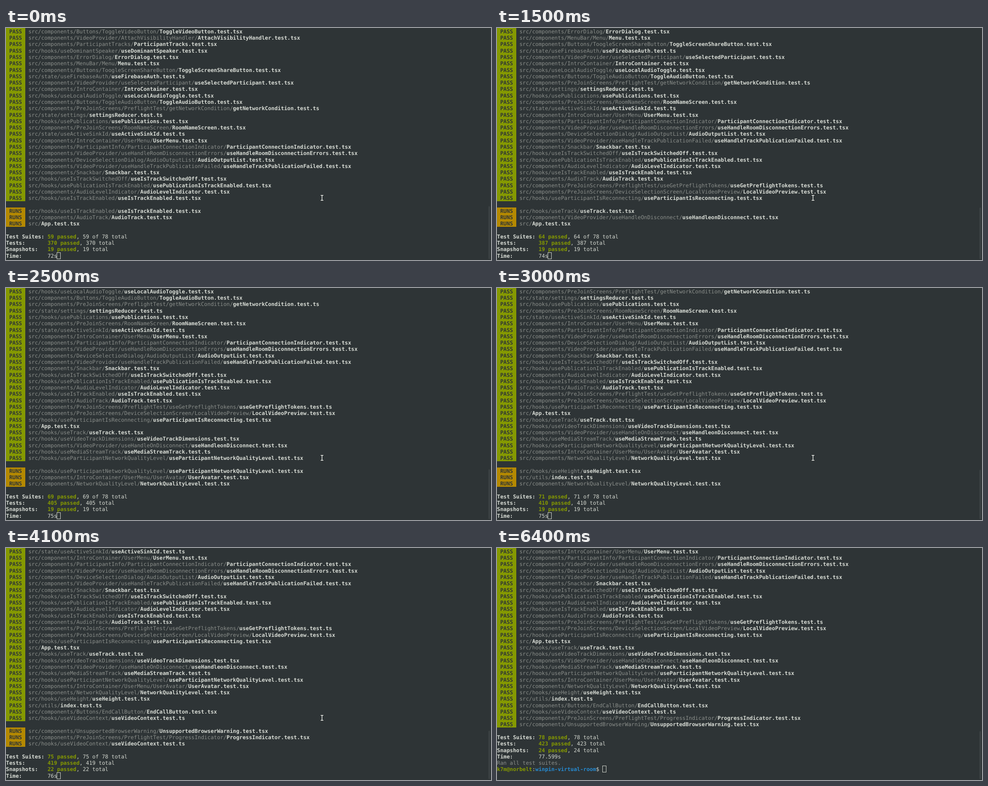
An HTML page that plays this animation: 1082x517 px, repeating every 7000 ms.

```html
<!DOCTYPE html>
<html lang="en">
<head>
<meta charset="utf-8">
<title>Test run</title>
<style>
  html, body { margin: 0; width: 100%; height: 100%; overflow: hidden; background: #2e3436; }
  #stage { position: relative; width: 1082px; height: 517px; overflow: hidden; }
  #screen {
    position: absolute; inset: 0; color: #d3d7cf;
    font: 11.853px/14.28px "DejaVu Sans Mono", monospace;
    text-rendering: geometricPrecision; font-variant-ligatures: none;
  }
  .row { position: absolute; left: 0; white-space: pre; }
  b { color: #d9ddd6; }
  .dim { color: #8b8f8b; }
  .tag { color: #2e3436; }
  .ok { color: #859900; }
  .dir { color: #268bd2; }
  .block { position: absolute; left: 0; width: 43px; }
  .caret {
    position: absolute; top: -1px; width: 9px; height: 15px; margin-left: -.8px;
    box-sizing: border-box; border: 1px solid #d3d7cf;
  }
  #bar { position: absolute; left: 1076px; width: 4px; bottom: 2px; background: #3a4042; border-radius: 2px; }
  #mouse { position: absolute; left: -4px; top: -7px; }
</style>
</head>
<body>
<div id="stage">
  <div id="screen"></div>
  <div id="bar"></div>
  <svg id="mouse" width="8" height="14" viewBox="-4 -7 8 14" fill="none">
    <defs><path id="beam" d="M-3-5.5H3M0-5.5V5.5M-3 5.5H3"/></defs>
    <use href="#beam" stroke="#1d2122" stroke-width="3"/>
    <use href="#beam" stroke="#f2f4f0" stroke-width="1.5"/>
  </svg>
</div>
<script>
const LOOP = 7000, STEP = 100, ROW = 14.28, MAX_TOP = 17;

const suites = `
components/Buttons/ToggleVideoButton/ToggleVideoButton.tsx
components/VideoProvider/AttachVisibilityHandler/AttachVisibilityHandler.tsx
components/ParticipantTracks/ParticipantTracks.tsx
hooks/useDominantSpeaker/useDominantSpeaker.tsx
components/ErrorDialog/ErrorDialog.tsx
components/MenuBar/Menu/Menu.tsx
components/Buttons/ToogleScreenShareButton/ToggleScreenShareButton.tsx
state/useFirebaseAuth/useFirebaseAuth.ts
components/VideoProvider/useSelectedParticipant/useSelectedParticipant.tsx
components/IntroContainer/IntroContainer.tsx
hooks/useLocalAudioToggle/useLocalAudioToggle.tsx
components/Buttons/ToggleAudioButton/ToggleAudioButton.tsx
components/PreJoinScreens/PreflightTest/getNetworkCondition/getNetworkCondition.ts
state/settings/settingsReducer.ts
hooks/usePublications/usePublications.tsx
components/PreJoinScreens/RoomNameScreen/RoomNameScreen.tsx
state/useActiveSinkId/useActiveSinkId.ts
components/IntroContainer/UserMenu/UserMenu.tsx
components/ParticipantInfo/ParticipantConnectionIndicator/ParticipantConnectionIndicator.tsx
components/VideoProvider/useHandleRoomDisconnectionErrors/useHandleRoomDisconnectionErrors.tsx
components/DeviceSelectionDialog/AudioOutputList/AudioOutputList.tsx
components/VideoProvider/useHandleTrackPublicationFailed/useHandleTrackPublicationFailed.tsx
components/Snackbar/Snackbar.tsx
hooks/useIsTrackSwitchedOff/useIsTrackSwitchedOff.tsx
hooks/usePublicationIsTrackEnabled/usePublicationIsTrackEnabled.tsx
components/AudioLevelIndicator/AudioLevelIndicator.tsx
hooks/useIsTrackEnabled/useIsTrackEnabled.tsx
components/AudioTrack/AudioTrack.tsx
components/PreJoinScreens/PreflightTest/useGetPreflightTokens/useGetPreflightTokens.ts
components/PreJoinScreens/DeviceSelectionScreen/LocalVideoPreview/LocalVideoPreview.tsx
hooks/useParticipantIsReconnecting/useParticipantIsReconnecting.tsx
App.tsx
hooks/useTrack/useTrack.tsx
hooks/useVideoTrackDimensions/useVideoTrackDimensions.tsx
components/VideoProvider/useHandleOnDisconnect/useHandleonDisconnect.tsx
hooks/useMediaStreamTrack/useMediaStreamTrack.ts
hooks/useParticipantNetworkQualityLevel/useParticipantNetworkQualityLevel.tsx
components/IntroContainer/UserMenu/UserAvatar/UserAvatar.tsx
components/NetworkQualityLevel/NetworkQualityLevel.tsx
hooks/useHeight/useHeight.tsx
utils/index.ts
components/Buttons/EndCallButton/EndCallButton.tsx
hooks/useVideoContext/useVideoContext.ts
components/PreJoinScreens/PreflightTest/ProgressIndicator/ProgressIndicator.tsx
components/UnsupportedBrowserWarning/UnsupportedBrowserWarning.tsx`.trim().split('\n');

// Suites finish in list order; three runners take the next one from the queue.
const FIRST = 26, RUNNERS = [26, 27, 31];
const queue = [29, 28, 30, 32, 34, 35, 33, 36, 37, 38, 39, 40, 42, 44, 41, 43];

// Key points of progress, linear in between: time, lines printed, suites counted, tests
const TIME = 0, PRINTED = 1, DONE = 2, TESTS = 3;
const keys = [
  [0, 27, 59, 370], [100, 28, 60, 372], [300, 28, 61, 377], [1000, 29, 62, 381],
  [1700, 33, 66, 394], [2500, 37, 69, 405], [3400, 41, 74, 418],
  [4100, 43, 75, 419], [4400, 43, 75, 419], [4700, 45, 78, 423]
];

function progress(from, to, value) {
  const i = keys.findLastIndex(key => key[from] <= value);
  const a = keys[i], b = keys[i + 1];
  if (!b) return a[to];
  return Math.floor(a[to] + (b[to] - a[to]) * (value - a[from]) / (b[from] - a[from]) + 1e-6);
}

function running(done) {
  const slots = [...RUNNERS], finished = done - keys[0][DONE];
  for (let i = 0; i < finished; i++) slots[slots.indexOf(FIRST + i)] = queue[i];
  return slots.filter(id => id !== undefined);
}

const $ = id => document.getElementById(id);
const caret = '<span class="caret"></span>';

function suiteLine(tag, id) {
  const path = 'src/' + suites[id].replace(/\.(tsx?)$/, '.test.$1');
  const cut = path.lastIndexOf('/') + 1;
  return `<b class="tag"> ${tag} </b> <span class="dim">${path.slice(0, cut)}</span><b>${path.slice(cut)}</b>`;
}

const label = text => `<b>${text.padEnd(13)}</b>`;
const count = (name, n, total = n) =>
  `${label(name)}<b class="ok">${n} passed</b>, ${total} total`;
const block = (from, rows, color) =>
  `<div class="block" style="top:${from * ROW}px;height:${rows * ROW}px;background:${color}"></div>`;

function screenAt(t) {
  const printed = progress(TIME, PRINTED, t), done = progress(TIME, DONE, t);
  const runs = running(done);
  const top = Math.min(printed - 27, MAX_TOP), shown = printed - top;
  const ended = t >= 4800, prompt = t >= 4900;
  const seconds = ended ? 77.599 : Math.min(77, 72 + Math.floor((t + 700) / 1000));
  const snaps = done >= 78 ? 24 : done >= 72 ? 22 : 19;

  const lines = [];
  for (let id = top; id < printed; id++) lines.push(suiteLine('PASS', id));
  lines.push('');
  if (runs.length) lines.push(...runs.map(id => suiteLine('RUNS', id)), '');
  lines.push(
    count('Test Suites:', done, done < 78 ? `${done} of 78` : done),
    count('Tests:', progress(DONE, TESTS, done)),
    count('Snapshots:', snaps),
    `${label('Time:')}${seconds}s`
  );
  if (ended) lines.push('<span class="dim">Ran all test suites.</span>');
  if (prompt) lines.push('<b class="ok">k7m@norbelt</b>:<b class="dir">winpin-virtual-room</b>$ ');
  lines[lines.length - 1] += caret;

  const html = block(0, shown, '#859900') + block(shown + 1, runs.length, '#b58900') +
    lines.map((line, i) => `<div class="row" style="top:${(i * ROW + .9).toFixed(2)}px">${line}</div>`).join('');
  return { html, barTop: 397 + top * .65 };
}

const ramp = (t, from, to) => Math.min(1, Math.max(0, (t - from) / (to - from)));
const bend = (a, b, c, p) => (1 - p) ** 2 * a + 2 * p * (1 - p) * b + p * p * c;

// Two small nudges, then a sweep to the right and out through the top.
function pointerAt(t) {
  const drift = ramp(t, 4500, 4900), nudge = ramp(t, 5200, 5400), sweep = ramp(t, 5500, 6300);
  return [
    bend(705 - 16 * drift - 94 * nudge, 1090, 140, sweep),
    bend(378.5 + 14 * drift - 5 * nudge, 230, 7.5, sweep)
  ];
}

let current = -1;

function draw(now) {
  const t = Math.floor(now % LOOP / STEP) * STEP;
  if (t === current) return;
  current = t;
  const { html, barTop } = screenAt(t);
  $('screen').innerHTML = html;
  $('bar').style.top = barTop + 'px';
  const [x, y] = pointerAt(t);
  $('mouse').style.transform = `translate(${x}px, ${y}px)`;
  $('mouse').style.visibility = t < 6400 ? 'visible' : 'hidden';
}

const start = performance.now();
function loop() {
  draw(performance.now() - start);
  requestAnimationFrame(loop);
}
loop();
</script>
</body>
</html>
```
